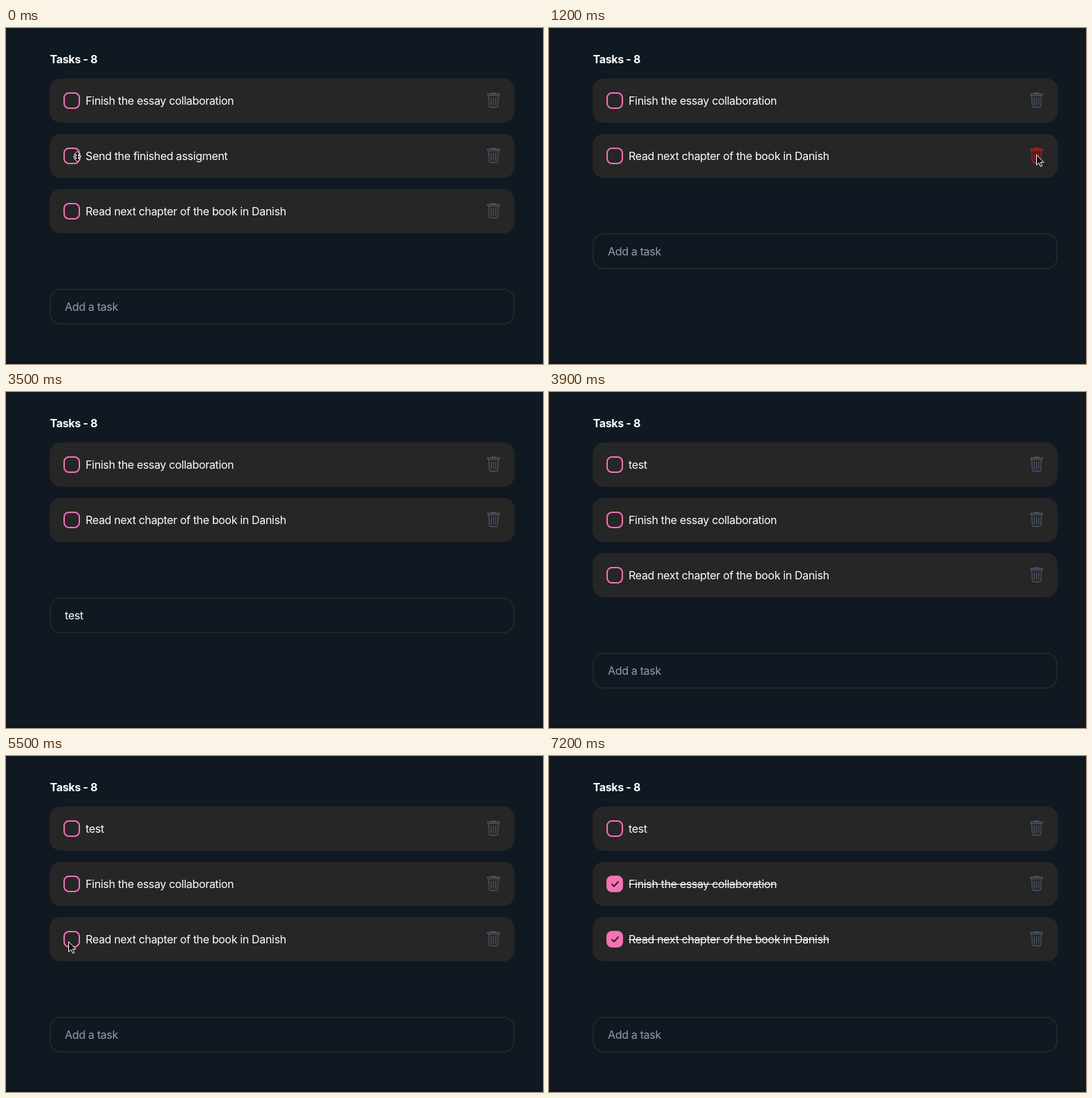
Recreate the animation shown at these times as an HTML page. Size 776x486 px, loop 7.6 s.

```html
<!DOCTYPE html>
<html lang="en">
<head>
<meta charset="utf-8">
<title>Task list</title>
<style>
html, body { margin: 0; width: 100%; height: 100%; overflow: hidden; background: #101822; }
#stage { position: relative; width: 776px; height: 486px; overflow: hidden; color: #fff;
  font: 16px Inter, sans-serif; letter-spacing: -.33px; white-space: pre;
  box-shadow: inset 0 -4px #0e161f; }
#stage > * { position: absolute; }
h1 { margin: 0; left: 63.5px; top: 35px; font-size: 16px; line-height: 20px; font-weight: 650; }
.row { left: 63px; width: 672px; height: 64px; border-radius: 16px; background: #262627; line-height: 64px; }
.row span { position: absolute; left: 52px; }
.done span { text-decoration: line-through; text-decoration-thickness: 1px; }
.row svg { position: absolute; inset: 0; }
.field { left: 63px; width: 672px; height: 52px; box-sizing: border-box; border: 2px solid #262627;
  border-radius: 16px; padding-left: 20px; line-height: 48px; }
.hint { color: #979da7; }
.caret { display: inline-block; width: 1px; height: 18px; margin-right: -1px; background: #fff; vertical-align: -4px; }
.pointer { left: 0; top: 0; fill: #111; stroke: #fff; stroke-linejoin: round; }
</style>
</head>
<body>
<div id="stage"></div>
<script>
const LOOP = 7600, STEP = 100, BLINK = 500;
const REMOVE = 1200, FOCUS = 2100, TYPE = 2600, ADD = 3900, BLUR = 5500;
const stage = document.getElementById('stage');
const between = (t, start, end) => t >= start && t < end;

const FINISH = 'Finish the essay collaboration';
const SEND = 'Send the finished assigment';
const READ = 'Read next chapter of the book in Danish';

function tasksAt(t) {
  if (t < REMOVE) return [[FINISH], [SEND, t >= 200], [READ]];
  if (t < ADD) return [[FINISH], [READ]];
  return [['test'], [FINISH, t >= 6500], [READ, t >= 5700]];
}

const typedAt = t => t < ADD ? 'test'.slice(0, Math.max(0, (t - TYPE) / STEP)) : '';

function caretAt(t) {
  const blinkOn = since => Math.floor((t - since) / BLINK) % 2 === 0;
  if (between(t, FOCUS, TYPE + STEP)) return blinkOn(FOCUS);
  if (between(t, TYPE + STEP, ADD)) return t < TYPE + 4 * STEP || blinkOn(TYPE + 4 * STEP);
  return between(t, ADD + STEP, BLUR) && blinkOn(ADD + STEP);
}

const boxTip = row => [90, 108 + 80 * row];
const binTip = row => [704, 103 + 80 * row];

// Eases from point to point, resting between legs of [start, end, point].
function tour(t, point, ...legs) {
  for (const [start, end, next] of legs) {
    const k = Math.min(1, Math.max(0, (t - start) / (end - start)));
    point = point.map((v, i) => v + (next[i] - v) * k * k * (3 - 2 * k));
  }
  return point;
}

function pointerAt(t) {
  if (between(t, 100, TYPE + STEP)) return tour(t, boxTip(1),
    [300, 1100, binTip(1)], [1200, 1800, [61, 318]], [1800, 2200, [327, 332]]);
  if (between(t, 4500, 7200)) return tour(t, [340, 342],
    [4500, 4800, [319, 456]], [4800, 5000, [139, 350]], [5100, 5500, boxTip(2)],
    [5800, 6200, boxTip(1)], [6600, 7200, [245, 462]]);
}

const checkbox = done => `<rect x="21" y="21" width="22" height="22" rx="7"
  fill="${done ? '#f472b6' : 'none'}" stroke="#f472b6" stroke-width="2"/>` +
  (done ? '<path d="M28 32.5l3 3 6-6.5" fill="none" stroke="#262627" stroke-width="2" stroke-linecap="round" stroke-linejoin="round"/>' : '');

const trash = hot => `<path transform="translate(641.5 31)" fill="none" stroke="${hot ? '#b91c1c' : '#4b5563'}"
  stroke-width="1.3" stroke-linecap="round" stroke-linejoin="round"
  d="M-9-8.5H9L8-6.3H-8zM-3.5-8.7v-1.1h7v1.1M-7-6L-6 9q.1 1.5 1.5 1.5h9Q5.9 10.5 6 9L7-6M-3.2-3V7M0-3V7M3.2-3V7"/>`;

const ring = `<g transform="translate(641 31)" stroke="#fff" stroke-width="1.2">
  <circle r="22" fill="#000"/><circle r="18.3" fill="#1a1a1a"/></g>`;

const row = ([text, done], i, hot, focused) =>
  `<div class="row${done ? ' done' : ''}" style="top:${73 + 80 * i}px"><span>${text}</span>
    <svg width="672" height="64">${focused ? ring : ''}${checkbox(done)}${trash(hot)}</svg></div>`;

const ARROW = 'M.5.5v14.8l3.4-3.2 2.5 5.3 2.3-1-2.4-5.1h4.7z';
const RESIZE = 'M0-7.5L4.5-3h-3v2H5v2H1.5v2h3L0 7.5-4.5 3h3V1H-5v-2h3.5v-2h-3z';
const cursor = ([x, y], shape) => `<svg class="pointer" width="776" height="486">
  <path transform="translate(${x} ${y})" d="${shape}"/></svg>`;

function draw(t) {
  const tip = pointerAt(t), tasks = tasksAt(t), typed = typedAt(t);
  const hot = i => tip && Math.hypot(tip[0] - 704, tip[1] - 104 - 80 * i) < 20;
  const caret = caretAt(t) ? '<i class="caret"></i>' : '';
  stage.innerHTML = '<h1>Tasks - 8</h1>' +
    tasks.map((task, i) => row(task, i, hot(i), i === 1 && between(t, REMOVE - STEP, REMOVE))).join('') +
    `<div class="field" style="top:${137 + 80 * tasks.length}px">` +
    (typed ? typed + caret : caret + '<span class="hint">Add a task</span>') + '</div>' +
    (tip ? cursor(tip, ARROW) : t < STEP ? cursor([103, 186], RESIZE) : '');
}

let shown = -1;
function tick() {
  const t = Math.floor(performance.now() % LOOP / STEP) * STEP;
  if (t !== shown) draw(shown = t);
  requestAnimationFrame(tick);
}
tick();
</script>
</body>
</html>
```
